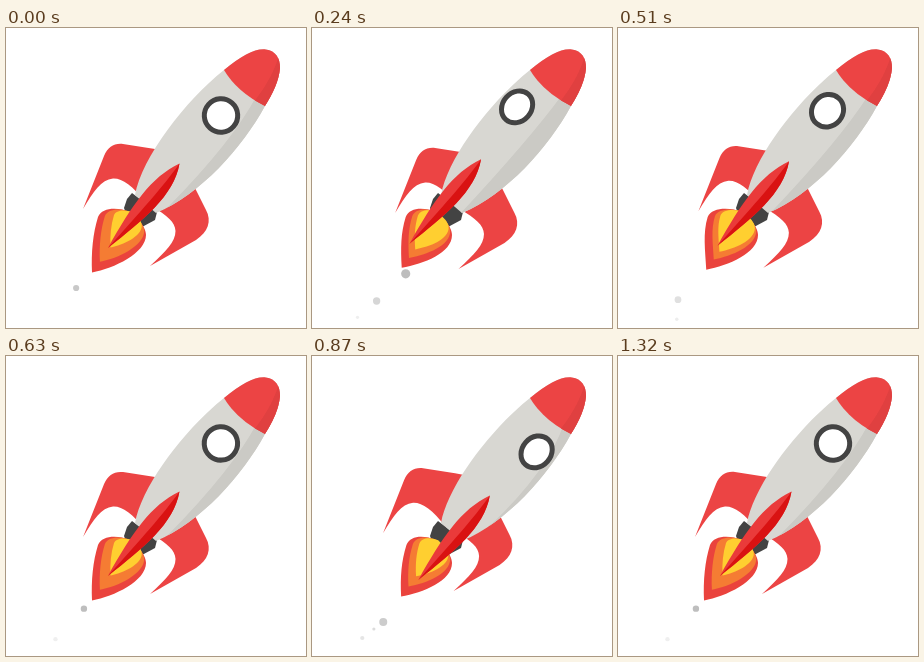
Animation, 300 px wide and 300 px high, one loop 1350 ms. Source, as an HTML page:

```html
<!DOCTYPE html>
<html lang="en">
<head>
<meta charset="utf-8">
<title>Rocket</title>
<style>
  html, body { margin: 0; width: 100%; height: 100%; overflow: hidden; background: #fff; }
  svg { display: block; width: 100vw; height: 100vh; }
</style>
</head>
<body>
<svg viewBox="0 0 300 300">
  <defs>
    <clipPath id="hull">
      <path d="M129 167C136 129 179 73 218 42C236 27 250 20 260 21.500C270 23 274 30 274 40C273 53 267 65 259 78C236 120 195 166 150 185Z"/>
    </clipPath>
  </defs>
  <g id="smoke"></g>
  <g fill="#ec4444">
    <path id="finL" d="M170 125L149 121L117 116C108 115 102 119 98 128L77 181C88 163 95 152 107 150.500C116 150 126 157 140 175Z"/>
    <path id="finR" d="M175 140L188 158L200 182C206 193 202 204 190 212L144 238C160 223 169.500 214 169.500 203C169 194 162 188 145 178Z"/>
  </g>
  <path fill="#434343" d="M126 165L121 171L118 180L122 191L136 199L149 192L151 184Z"/>
  <g id="flame">
    <path fill="#ea433d"/>
    <path fill="#f57c33"/>
    <path fill="#ffcf30"/>
  </g>
  <g clip-path="url(#hull)">
    <path fill="#d8d7d2" d="M100 0H300V220H100Z"/>
    <path id="shade" fill="#cbcac5"/>
    <path fill="#ec4444" d="M218 42Q231 64 259 78L300 70V0H218Z"/>
    <path fill="#e04040" d="M274 24Q268 48 249 72.500L259 78L300 70V24Z"/>
  </g>
  <ellipse id="pane" fill="#fff" stroke="#434343" stroke-width="5"/>
  <g id="keel">
    <path fill="#ea3a3a" d="M173.500 135.500C145 149 126 177 102 220C137 192 168 168 173.500 135.500Z"/>
    <path fill="#d91212" d="M173.500 135.500C157 159 135 183 102 220C137 192 168 168 173.500 135.500Z"/>
  </g>
</svg>
<script>
const LOOP = 1350, STEP = 30, FLICKER = 23;
const $ = id => document.getElementById(id);
const lerp = (a, b, k) => a + (b - a) * k;
const ease = k => (1 - Math.cos(Math.PI * Math.min(1, Math.max(0, k)))) / 2;
const span = (t, a, b) => ease((t - a) / (b - a));

// Birth and life in steps of the flicker cycle
const puffs = [
  { born: 7, life: 15, from: [98, 243], to: [48, 286], size: 4.6 },
  { born: 2, life: 12, from: [86, 252], to: [50, 294], size: 4.3 },
  { born: 20, life: 12, from: [82, 249], to: [44, 293], size: 3.2 },
  { born: 9, life: 9, from: [88, 262], to: [57, 295], size: 3.3 },
  { born: 3, life: 5, from: [73, 264], to: [57, 279], size: 2 }
];
for (const puff of puffs) {
  puff.dot = document.createElementNS('http://www.w3.org/2000/svg', 'circle');
  $('smoke').append(puff.dot);
}

function set(el, attrs) {
  for (const name in attrs) el.setAttribute(name, attrs[name]);
}

const shift = (id, x, y) => set($(id), { transform: `translate(${x} ${y})` });

// -1 is rolled up-left, 1 is rolled down-right
const roll = t =>
  t < 660 ? -span(t, 0, 255) * (1 - span(t, 390, 645))
          : span(t, 660, 900) * (1 - span(t, 1065, 1320));

function drawHull(u) {
  const k = Math.abs(u);
  shift('finL', -6.2 * u, -4 * u);
  shift('finR', -2.5 * u, -3 * u);
  shift('keel', 4.5 * u, 4.2 * u);
  set($('shade'), {
    d: `M${251 + u} 67Q${227 + 11 * u} 113 ${162 + 16 * u} ${179 - 9 * u}L200 220L300 70Z`
  });
  set($('pane'), {
    rx: 16.7 + 0.3 * k, ry: 16.7 - 2.3 * k,
    transform: `translate(${215 + 10 * u} ${87.5 + 8.7 * u}) rotate(-49)`
  });
}

// Three layers share one outline, scaled about the nozzle
function drawFlame(phase) {
  const lift = Math.max(0, Math.sin(Math.PI * phase / 21));
  const belly = Math.sin(2 * Math.PI * phase / 21);
  const x = 86 + 4 * lift, y = 244.5 - 5 * lift, left = 89 + 2.5 * belly;
  const d = `M124 184C112 179 ${left + 7} 179 ${left + 3} 189` +
    `C${left - 2} 205 ${x - 1} ${y - 20} ${x} ${y}` +
    `C${x + 22} ${y - 4} 140 225 140 207C140 202 137 198 135 195Z`;
  const scales = [1, 0.82, 0.58 + 0.12 * lift - 0.04 * belly];
  [...$('flame').children].forEach((layer, i) =>
    set(layer, { d, transform: `translate(130 185) scale(${scales[i]}) translate(-130 -185)` }));
}

function drawSmoke(phase) {
  for (const { born, life, from, to, size, dot } of puffs) {
    const k = (phase - born + FLICKER) % FLICKER / life;
    const grey = Math.round(185 + 58 * k);
    set(dot, {
      cx: lerp(from[0], to[0], 1 - Math.max(0, 1 - k) ** 1.3),
      cy: lerp(from[1], to[1], k),
      r: k < 1 ? size * (1 - 0.6 * k * k) : 0,
      fill: `rgb(${grey},${grey},${grey})`
    });
  }
}

function draw(ms) {
  const step = Math.floor(ms % LOOP / STEP), phase = step % FLICKER;
  drawHull(roll(step * STEP));
  drawFlame(phase);
  drawSmoke(phase);
}

const start = performance.now();
function tick() {
  draw(performance.now() - start);
  requestAnimationFrame(tick);
}
tick();
</script>
</body>
</html>
```
